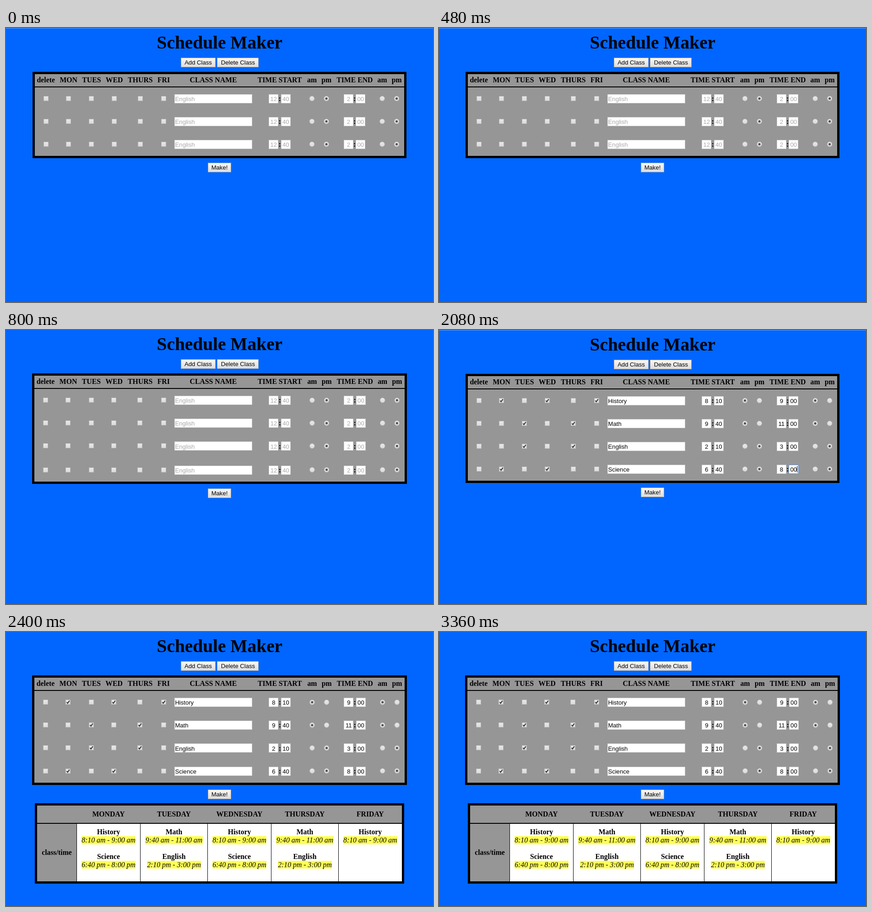
An HTML page that plays this animation: 933 px wide and 600 px high, repeating every 4000 ms.

```html
<!DOCTYPE html>
<html lang="en">
<head>
<meta charset="utf-8">
<title>Schedule Maker</title>
<style>
html, body { margin: 0; width: 100%; height: 100%; overflow: hidden; background: #0066ff; }
svg { display: block; position: absolute; left: 0; top: 0; }
text { font-kerning: none; white-space: pre; }
.h1 { font: bold 39.4px "Liberation Serif", Times, serif; }
.b { font: bold 15.76px "Liberation Serif", Times, serif; }
.i { font: italic 15.8px "Liberation Serif", Times, serif; }
.s { font: 13.12px "Liberation Sans", Arial, sans-serif; }
.hint { fill: #a9a9a9; }
</style>
</head>
<body>
<svg id="stage" width="933" height="600" viewBox="0 0 933 600">
  <defs>
    <linearGradient id="btn" x2="0" y2="1"><stop stop-color="#f8f8f8"/><stop offset="1" stop-color="#dcdcdc"/></linearGradient>
    <linearGradient id="chk" x2="0" y2="1"><stop stop-color="#e9e9e9"/><stop offset="1" stop-color="#dadada"/></linearGradient>
  </defs>
</svg>
<script>
const LOOP = 4000;
const GREY = '#969696';
const DAYS = ['MON', 'TUES', 'WED', 'THURS', 'FRI'];
const DAY_X = [136.5, 186.7, 236.3, 293.3, 344.3];
const blank = { name: 'English', days: '', start: ['12', '40', 'pm'], end: ['2', '00', 'pm'], hint: true };
const classes = [
  { name: 'History', days: 'MON WED FRI', start: ['8', '10', 'am'], end: ['9', '00', 'am'] },
  { name: 'Math', days: 'TUES THURS', start: ['9', '40', 'am'], end: ['11', '00', 'am'] },
  { name: 'English', days: 'TUES THURS', start: ['2', '10', 'pm'], end: ['3', '00', 'pm'] },
  { name: 'Science', days: 'MON WED', start: ['6', '40', 'pm'], end: ['8', '00', 'pm'] }
];
const scenes = [
  { at: 0, rows: Array(3).fill(blank), edge: true },
  { at: 800, rows: Array(4).fill(blank), zoom: true, drop: 2 },
  { at: 1600, rows: classes, edge: true, focus: true },
  { at: 2400, rows: classes, zoom: true, result: true }
];

const stage = document.getElementById('stage');

function el(parent, tag, attrs, str) {
  const n = document.createElementNS('http://www.w3.org/2000/svg', tag);
  for (const k in attrs) n.setAttribute(k, attrs[k]);
  if (str) n.textContent = str;
  return parent.appendChild(n);
}

// Drawing helpers for one group; zoom widens the page slightly around its centre.
function pen(g, zoom) {
  const k = zoom ? 1.002 : 1;
  const X = x => 466.5 + (x - 466.5) * k;
  const Y = y => y * k - (zoom ? 1 : 0);
  const R = Math.round;
  return {
    rect(x0, y0, x1, y1, fill) {
      const x = R(X(x0)), y = R(Y(y0));
      el(g, 'rect', { x, y, width: R(X(x1)) - x, height: R(Y(y1)) - y, fill });
    },
    // fixed-size box with an inner one-pixel outline
    box(x, y, w, h, fill, stroke) {
      el(g, 'rect', { x: R(X(x)) + .5, y: R(Y(y)) + .5, width: w - 1, height: h - 1, fill, stroke });
    },
    text(x, y, str, cls, anchor = 'middle') {
      el(g, 'text', { x: X(x), y: R(Y(y)), class: cls, 'text-anchor': anchor }, str);
    },
    tick(x, y) {
      const px = R(X(x - 5.5)), py = R(Y(y - 6));
      el(g, 'path', { d: `M${px + 2.6} ${py + 5.6}l2 2.6l4.2 -5.8`, fill: 'none', stroke: '#333', 'stroke-width': 2 });
    },
    radio(x, y, on) {
      const c = { cx: X(x), cy: Y(y - .5) };
      el(g, 'circle', { ...c, r: 5.4, fill: 'url(#chk)', stroke: '#b2b2b2' });
      if (on) el(g, 'circle', { ...c, r: 2.5, fill: '#505050' });
    }
  };
}

function button(p, x, y, w, label) {
  p.box(x, y, w, 21, 'url(#btn)', '#a6a6a6');
  p.text(x + w / 2, y + 15, label, 's');
}

function clock(p, x, y, [h, m, half], cls, amX, w) {
  p.box(x, y - 10, w, 20, '#fff', '#cfcfcf');
  p.box(x + 26.8, y - 10, 21, 20, '#fff', '#cfcfcf');
  p.text(x + 10.7, y + 5, h, cls);
  p.text(x + 24, y + 5, ':', 'b');
  p.text(x + 37.2, y + 5, m, cls);
  p.radio(amX, y, half === 'am');
  p.radio(amX + 31.6, y, half === 'pm');
}

function row(p, y, c) {
  const cls = c.hint ? 's hint' : 's';
  const picked = c.days.split(' ');
  [87, ...DAY_X].forEach((x, i) => {
    p.box(x - 5.5, y - 6, 11, 11, 'url(#chk)', '#b8b8b8');
    if (i && picked.includes(DAYS[i - 1])) p.tick(x, y);
  });
  p.box(368, y - 10, 170, 20, '#fff', '#cfcfcf');
  p.text(369.6, y + 5, c.name, cls, 'start');
  clock(p, 574, y, c.start, cls, 668.5, 21);
  clock(p, 737.6, y, c.end, cls, 822, 21);
}

function form(p, s) {
  const n = s.rows.length;
  const rowY = i => 155 + 50 * i + (i === 3 && s.drop || 0);
  const bottom = rowY(n - 1) + 30;
  p.text(466.8, 45, 'Schedule Maker', 'h1');
  button(p, 382, 65, 76, 'Add Class');
  button(p, 461.4, 65, 91, 'Delete Class');
  p.rect(58, 96, 875, bottom, '#000');
  p.rect(63, 101, 870, bottom - 5, GREY);
  p.rect(63, 128, 870, 130, '#000');
  const heads = [['delete', 87.3], ...DAYS.map((d, i) => [d, DAY_X[i] + .2]), ['CLASS NAME', 453],
    ['TIME START', 598], ['am', 668.5], ['pm', 700.3], ['TIME END', 761.8], ['am', 822], ['pm', 853.7]];
  heads.forEach(([t, x]) => p.text(x, 119, t, 'b'));
  s.rows.forEach((c, i) => row(p, rowY(i), c));
  button(p, 441, bottom + 10, 51, 'Make!');
}

function caret(p) {
  p.box(764, 295, 22, 20, 'none', '#5f9be8');
  p.rect(782, 298, 783, 312, '#000');
}

function timetable(p) {
  const lines = [154, 293, 440, 579, 726, 865];
  p.rect(63, 375, 870, 551, '#000');
  p.rect(68, 380, 865, 418, GREY);
  p.rect(68, 420, 154, 546, GREY);
  p.text(111, 488, 'class/time', 'b');
  ['MONDAY', 'TUESDAY', 'WEDNESDAY', 'THURSDAY', 'FRIDAY'].forEach((day, i) => {
    const x = (lines[i] + lines[i + 1]) / 2 + (i === 4 ? .3 : .5);
    p.rect(lines[i] + 1, 420, lines[i + 1], 546, '#fff');
    p.text(x, 404, day, 'b');
    classes.filter(c => c.days.split(' ').includes(DAYS[i])).forEach((c, j) => {
      const y = 443 + 54 * j - (j ? .4 : 0);
      const [a, b] = [c.start, c.end].map(([h, m, half]) => `${h}:${m} ${half}`);
      const half = a.length + b.length > 14 ? 63 : 59;
      p.text(x, y, c.name, 'b');
      p.rect(x - half, y + 4, x + half, y + 21.5, '#ffff55');
      p.text(x, y + 18, `${a} - ${b}`, 'i');
    });
  });
}

scenes.forEach((s, i) => {
  const g = el(stage, 'g', {});
  const p = pen(g, s.zoom);
  if (s.edge) p.rect(0, 0, 933, 1, '#5c9cf5');
  form(p, s);
  if (s.focus) caret(p);
  if (s.result) timetable(pen(g));
  const show = j => ({ visibility: j === i ? 'visible' : 'hidden', easing: 'steps(1, end)' });
  const steps = scenes.map((t, j) => ({ offset: t.at / LOOP, ...show(j) }));
  steps.push({ offset: 1, ...show(scenes.length - 1) });
  g.animate(steps, { duration: LOOP, iterations: Infinity }).startTime = 0;
});
</script>
</body>
</html>
```
